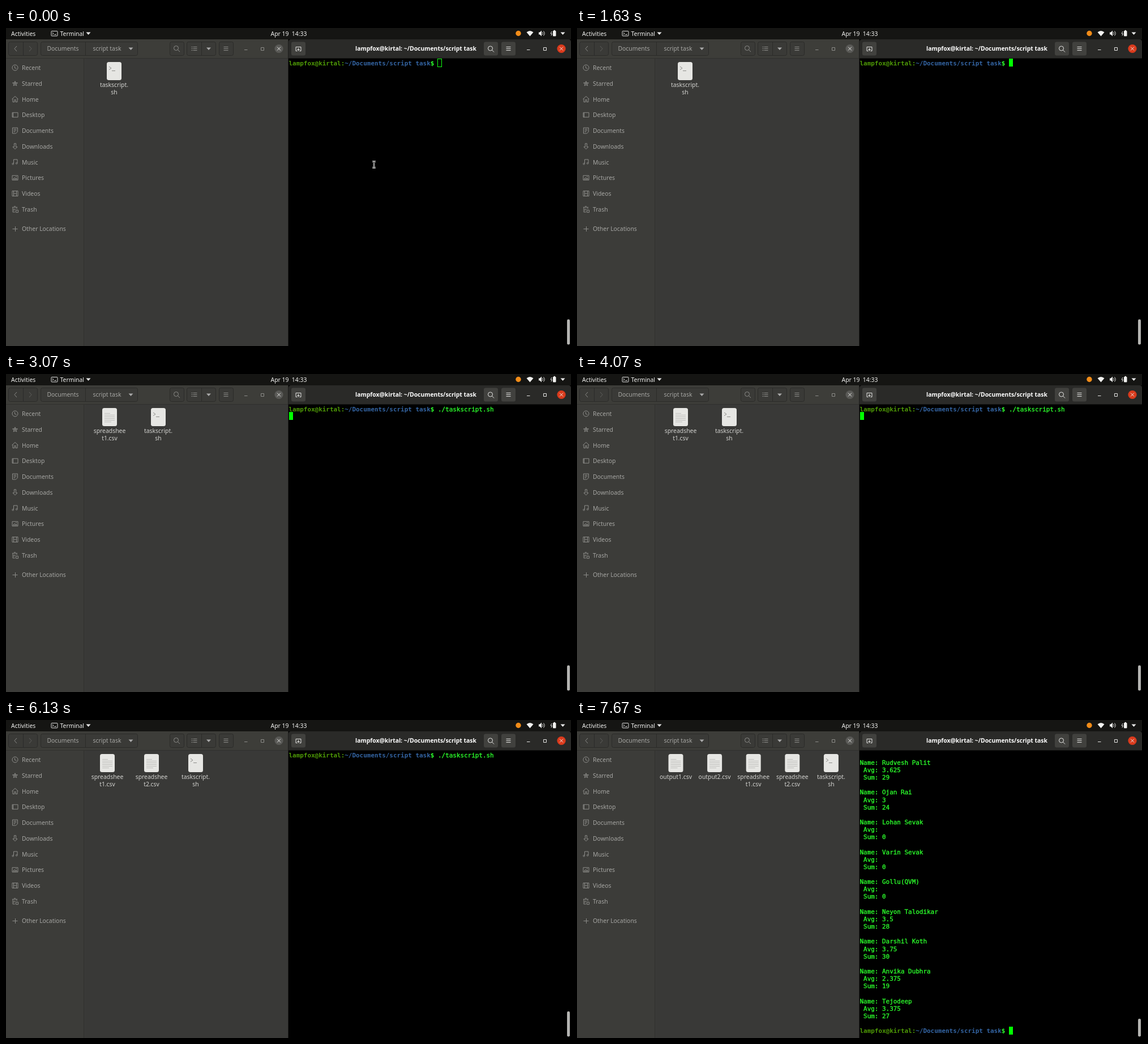
These frames come from a looping animation (998x561 px, 8000 ms). An HTML page:

```html
<!DOCTYPE html>
<html lang="en">
<head>
<meta charset="utf-8">
<title>Script task</title>
<style>
  html, body { margin: 0; width: 100%; height: 100%; overflow: hidden; background: #000; }
  svg { display: block; }
  text { font: 10.4px "Noto Sans", "Open Sans", sans-serif; fill: #a6a6a3; white-space: pre; }
  .mid { text-anchor: middle; }
  .bar { fill: #f2f2f0; }
  .title { font-weight: bold; fill: #fff; }
  .file { fill: #d3d3d0; }
  .term { font: 10.94px "DejaVu Sans Mono", "Noto Sans Mono", monospace; fill: #2cff2c; stroke: #2cff2c; stroke-width: .35px; }
  .prompt { font-weight: bold; stroke: none; }
  .user { fill: #4e9a06; }
  .path { fill: #3465a4; }
  .line { fill: none; stroke: #8c8c89; }
  .lit { stroke: #e6e6e4; }
  .faint { opacity: .45; }
  .thick { stroke-width: 2.6px; }
  .core { stroke: #000; stroke-width: .8px; }
</style>
</head>
<body>
<svg width="998" height="561" viewBox="0 0 998 561">
  <g id="desktop"></g>
  <g id="live"></g>
</svg>
<script>
const LOOP = 8000, CELL = 6.585, ROW = 13.15, LEFT = 499.5;
const USER = 'lampfox@kirtal', FOLDER = '~/Documents/script task';
const COMMAND = './taskscript.sh';

const rect = (x, y, w, h, fill, more = '') =>
  `<rect x="${x}" y="${y}" width="${w}" height="${h}" fill="${fill}" ${more}/>`;
const text = (x, y, str, cls = '') => `<text x="${x}" y="${y}" class="${cls}">${str}</text>`;
const line = (d, cls = '', x = 0, y = 0) =>
  `<path class="line ${cls}" d="${d}" transform="translate(${x} ${y})"/>`;
const triangle = (x, y, fill) => `<path d="M${x - 4} ${y - 2}h8l-4 4.5z" fill="${fill}"/>`;
const circle = (x, y, r, fill) => `<circle cx="${x}" cy="${y}" r="${r}" fill="${fill}"/>`;

// Icons are drawn around their own centre.
const icon = {
  search: 'M3 -1a4 4 0 1 1 -8 0a4 4 0 1 1 8 0M2 2l3.5 3.5',
  menu: 'M-4 -3.5h8M-4 -.5h8M-4 2.5h8',
  cross: 'M-3 -3l6 6M3 -3l-6 6',
  list: 'M-5 -3.5h2M-2 -3.5h7M-5 -.5h2M-2 -.5h7M-5 2.5h2M-2 2.5h7',
  newTab: 'M-2 3.5h-2.5v-7h9v7h-2.5M0 -1.5v5M-2.5 1h5',
  beam: 'M-3 -5.5h2l1 1 1-1h2M0 -4.5v9M-3 5.5h2l1-1 1 1h2',
};

const places = [
  ['Recent', 'M5 0a5 5 0 1 1 -10 0a5 5 0 1 1 10 0M-.5 -3v3.5l3 1'],
  ['Starred', 'M0 -4l1.2 2.8 3.3 .3-2.5 2 .8 3-2.8-1.6-2.8 1.6.8-3-2.5-2 3.3-.3zM-2 0h4M0 -2v4'],
  ['Home', 'M-5.5 0l5.5-5 5.5 5M-4 -1v6h3v-4h2v4h3v-6'],
  ['Desktop', 'M-5 -4h10v8h-10zM-3.5 -4v8'],
  ['Documents', 'M-4.5 -5h9v7l-3 3h-6zM-2.5 -2.5h5M-2.5 0h5M-2.5 2h2.5'],
  ['Downloads', 'M-1.5 -5h3v6h2.5l-4 4-4-4h2.5z'],
  ['Music', 'M-2.5 3v-7.5h6.5v6.5M-2.5 3.2a1.3 1.3 0 1 1 -2.6 0a1.3 1.3 0 1 1 2.6 0M4 2.2a1.3 1.3 0 1 1 -2.6 0a1.3 1.3 0 1 1 2.6 0'],
  ['Pictures', 'M-5 -4h10v8h-10zM-3.5 2.5l2.5-3 2 2 1-1 1.5 2zM1 -2h2'],
  ['Videos', 'M-5 -4.5h10v9h-10zM-2.5 -4.5v9M2.5 -4.5v9M-2.5 0h5'],
  ['Trash', 'M-5 -3.5h9M-2 -5h3M-4 -3.5v8.5h4M3 -3.5v3M-2 -1v4M0 -1v2M1.5 1.5h4v4h-4z'],
];

function topBar() {
  return rect(0, 0, 998, 20, '#151513') +
    text(9, 13.5, 'Activities', 'bar') +
    rect(80, 5.5, 11, 8.5, 'none', 'stroke="#ddd" rx="1"') + line('M82 8l2 1.8-2 1.8M85.5 11.5h3', 'lit') +
    text(95.5, 13.5, 'Terminal', 'bar') + triangle(145.5, 9.5, '#eee') +
    text(499.5, 13.5, 'Apr 19  14:33', 'bar mid') +
    circle(905, 9.5, 4.7, '#f28c18') +
    '<path d="M919.5 7.5q6-5 12 0l-6 7z" fill="#f2f2f0"/>' +
    '<path d="M941 7.5h2l3-3v10l-3-3h-2z" fill="#f2f2f0"/>' + line('M947.5 7q2 2.5 0 5M949.5 5.5q3.5 4 0 8', 'lit') +
    line('M964 6l-2 4h2.5l-1.5 3.5', 'lit') + rect(966, 5, 5.5, 9.5, '#f2f2f0', 'rx="1"') +
    rect(967.5, 3.8, 2.5, 2, '#f2f2f0') + triangle(983.5, 9.5, '#eee');
}

function filesWindow() {
  const box = (x, w) => rect(x + .5, 24.5, w - 1, 24, '#3a3a37', 'stroke="#2b2b29" rx="3"');
  const rows = places.map(([name, d], i) => {
    const y = 70 + 27.75 * i;
    return line(d, '', 16, y) + text(28, y + 4, name);
  }).join('');
  return rect(0, 20, 499, 541, '#393937') + rect(0, 20, 499, 33.5, '#3d3d39') +
    rect(0, 53.5, 137, 508, '#3c3c39') + rect(137, 53.5, 1, 508, '#30302e') +
    rect(0, 53, 499, 1, '#30302d') + rect(498, 20, 1, 541, '#20201e') +
    box(4, 52) + rect(30, 25, 1, 23, '#2b2b29') +
    line('M19 32l-4 4.5 4 4.5') + line('M41 32l4 4.5-4 4.5', 'faint') +
    box(61, 172) + rect(140, 25, 1, 23, '#2b2b29') +
    text(100.5, 40, 'Documents', 'mid') + text(178.5, 40, 'script task', 'mid') + triangle(220.5, 36.5, '#aaa') +
    box(289, 26) + line(icon.search, '', 301.5, 36.5) +
    box(319, 52) + rect(345, 25, 1, 23, '#2b2b29') + line(icon.list, '', 332.5, 37) + triangle(358, 36.5, '#aaa') +
    box(376, 26) + line(icon.menu, '', 388.5, 37) +
    line('M421 38.5h5.5M450.5 34.5h5v5h-5z') +
    circle(482, 36.5, 7.6, '#595956') + line(icon.cross, 'lit', 482, 36.5) +
    rows + line('M-4.5 .5h9M.5 -4v9', '', 16, 354) + text(28, 358, 'Other Locations');
}

function terminalWindow() {
  const box = (x, d) => rect(x, 24.5, 25, 24, '#41413e', 'rx="3"') + line(d, 'lit', x + 12.5, 37);
  return rect(499, 20, 499, 541, '#000') +
    '<path d="M499 53.5v-29q0-4.5 4.5-4.5h490q4.5 0 4.5 4.5v29z" fill="#2a2a28"/>' +
    box(504, icon.newTab) + box(844, icon.search) + box(875, icon.menu) +
    text(724, 40, `${USER}: ${FOLDER}`, 'title mid') +
    line('M920 38.5h5.5M949.5 34.5h5v5h-5z', 'lit') +
    circle(981, 36.5, 7.6, '#da3a1c') + line(icon.cross, 'lit', 981, 36.5);
}

function file(name, x) {
  const csv = name.endsWith('.csv');
  const cut = name.startsWith('spread') ? 10 : name.startsWith('task') ? 11 : name.length;
  const mark = csv
    ? 'M-9 69.5h10M-9 72.5h18M-9 75.5h18M-9 78.5h18M-9 81.5h18M-9 84.5h12'
    : 'M-9 68l4 2.8-4 2.8M-4 75.5h6';
  return rect(x - 13, 60, 26, 32, '#e6e6e3', 'rx="3.5"') +
    line(mark, csv ? 'faint' : '', x, 0) +
    text(x, 104, name.slice(0, cut), 'file mid') + text(x, 116.7, name.slice(cut), 'file mid');
}

const results = [
  ['Rudvesh Palit', 3.625, 29], ['Ojan Rai', 3, 24], ['Lohan Sevak', '', 0],
  ['Varin Sevak', '', 0], ['Gollu(QVM)', '', 0], ['Neyon Talodikar', 3.5, 28],
  ['Darshil Koth', 3.75, 30], ['Anvika Dubhra', 2.375, 19], ['Tejodeep', 3.375, 27],
];

const termRow = (row, str, cls = '') => text(LEFT, 65.6 + ROW * row, str, 'term ' + cls);
const prompt = row => termRow(row,
  `<tspan class="user">${USER}:</tspan><tspan class="path">${FOLDER}</tspan>$`, 'prompt');
const cursor = (col, row, hollow) => {
  const x = Math.round(LEFT + CELL * col), y = Math.floor(54.7 + ROW * row);
  return hollow ? rect(x - .5, y + .5, 7, 14, 'none', 'stroke="#1f1"') : rect(x, y, 7, 14, '#0f0');
};
const report = results.map(([name, avg, sum], i) =>
  termRow(4 * i + 1, 'Name: ' + name) + termRow(4 * i + 2, ' Avg: ' + avg) +
  termRow(4 * i + 3, ' Sum: ' + sum)).join('');

function fileList(t) {
  const sheets = ['spreadsheet1.csv', 'spreadsheet2.csv'], script = 'taskscript.sh';
  if (t < 3070) return [[script], 191, 0];
  if (t < 6130) return [[sheets[0], script], 183, 86];
  if (t < 7600) return [[...sheets, script], 179, 78];
  return [['output1.csv', 'output2.csv', ...sheets, script], 174.5, 68.6];
}

// The cursor blinks every 600 ms, starting over at each key press.
const blinkOn = t => {
  const start = t < 1630 ? 100 : t < 2900 ? 1630 : t < 7530 ? 2870 : 7530;
  return Math.floor((t - start) / 600) % 2 === 0;
};

function terminal(t) {
  const home = USER.length + FOLDER.length + 3;
  const done = t >= 7530, entered = t >= 2900, typed = t >= 2830;
  const caret = done ? [home, 37] : entered ? [0, 1] : [home + (typed ? COMMAND.length + 1 : 0), 0];
  const body = done ? report + prompt(37)
    : prompt(0) + (typed ? text(LEFT + CELL * home, 65.6, COMMAND, 'term') : '');
  const thumb = done ? 527 : 514;
  return body + (t < 100 || blinkOn(t) ? cursor(...caret, t < 100) : '') +
    rect(991, thumb, 5, 558.5 - thumb, '#b4b4b1', 'rx="2.2"');
}

function scene(t) {
  const [names, first, step] = fileList(t);
  const pointer = line(icon.beam, 'lit thick', 650, 241) + line(icon.beam, 'core', 650, 241);
  return names.map((name, i) => file(name, first + step * i)).join('') + terminal(t) +
    (t < 1630 ? pointer : '');
}

document.getElementById('desktop').innerHTML = topBar() + filesWindow() + terminalWindow();
const live = document.getElementById('live');
let shown = '';
function draw() {
  const next = scene(performance.now() % LOOP);
  if (next !== shown) live.innerHTML = shown = next;
  requestAnimationFrame(draw);
}
draw();
</script>
</body>
</html>
```
